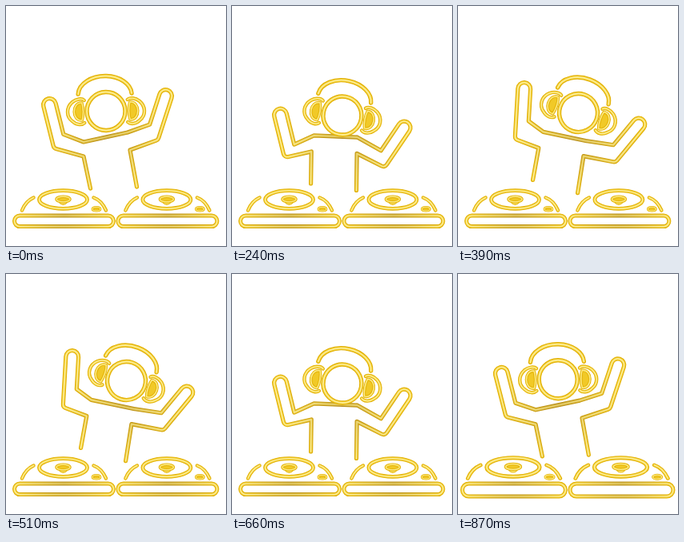
An HTML page with a canvas for the animation above (0.9 s loop, 275 by 300 pixels).

```html
<!DOCTYPE html>
<html lang="en">
<head>
<meta charset="utf-8">
<title>DJ</title>
<style>
  html, body { margin: 0; width: 100%; height: 100%; overflow: hidden; background: #fff; }
  canvas { display: block; width: 275px; height: 300px; }
</style>
</head>
<body>
<canvas id="stage" width="275" height="300"></canvas>
<script>
const ctx = document.getElementById('stage').getContext('2d');
const LOOP = 900, STEP = 30;
const GOLD = ['#e0ae04', '#f1c927', '#fcec90'];
const DULL = ['#b58c1c', '#c9a632', '#e3cb68'];
const HAND_RADIUS = 7.9, FOREARM = 40;

// Golds that turn duller towards a point.
function shaded(x, y, radius) {
  return GOLD.map((gold, i) => {
    const gradient = ctx.createRadialGradient(x, y, 0, x, y, radius);
    gradient.addColorStop(0, DULL[i]);
    gradient.addColorStop(1, gold);
    return gradient;
  });
}

function glow(path, width = 5.4, colors = GOLD) {
  ctx.lineJoin = ctx.lineCap = 'round';
  [1, 0.66, 0.34].forEach((part, i) => {
    ctx.strokeStyle = colors[i];
    ctx.lineWidth = width * part;
    ctx.stroke(path);
  });
}

function filledGlow(path, width) {
  ctx.fillStyle = GOLD[1];
  ctx.fill(path);
  glow(path, width);
}

function ellipse(x, y, rx, ry, from = 0, to = 2 * Math.PI) {
  const path = new Path2D();
  path.ellipse(x, y, rx, ry, 0, from, to);
  return path;
}

// The whole dance is one sway to the right and back, with a bob halfway.
function dancer(time) {
  const sway = (1 - Math.cos(2 * Math.PI * time / LOOP)) / 2;
  const bob = 4 * sway * (1 - sway);
  const move = (from, shift, dip = 0) => from + shift * sway + dip * bob;
  const lean = move(8.5, -16.5);
  return {
    head: { x: move(125, 27, -2), y: move(131.5, 1.3, 4.8), tilt: move(-1, 20) },
    left: {
      side: -1, lean, leg: 40,
      handX: move(54.5, 31.5, -11.5), handY: move(123.5, -25.5, 27),
      tilt: move(-14, 20, -11), reach: move(54, 11, -7),
      waistX: move(97, 4), waistY: move(188, -11),
      shoulderX: move(97, 10), shoulderY: move(170, -13, -1)
    },
    right: {
      side: 1, lean, leg: 46,
      handX: move(199.5, 27.5, 0.5), handY: move(112.5, 33.4, 21.3),
      tilt: move(18, 22, 4), reach: 55,
      waistX: move(155, 2), waistY: move(180, 8),
      shoulderX: move(152, 8), shoulderY: move(158, 11)
    }
  };
}

// From the foot up the side, round the hand and back to the shoulder.
function armPath(arm) {
  const path = new Path2D(), angle = arm.tilt * Math.PI / 180;
  const upX = Math.sin(angle), upY = -Math.cos(angle);
  const outX = -upY * arm.side, outY = upX * arm.side;
  const outerX = arm.handX + outX * HAND_RADIUS, outerY = arm.handY + outY * HAND_RADIUS;
  const innerX = arm.handX - outX * HAND_RADIUS, innerY = arm.handY - outY * HAND_RADIUS;
  const start = Math.atan2(outY, outX);

  path.moveTo(arm.waistX + arm.lean, arm.waistY + arm.leg);
  path.lineTo(arm.waistX, arm.waistY);
  path.arcTo(outerX - upX * arm.reach, outerY - upY * arm.reach, outerX, outerY, 5);
  path.lineTo(outerX, outerY);
  path.arc(arm.handX, arm.handY, HAND_RADIUS, start, start - arm.side * Math.PI, arm.side > 0);
  path.lineTo(innerX - upX * FOREARM, innerY - upY * FOREARM);
  path.lineTo(arm.shoulderX, arm.shoulderY);
  return path;
}

function drawBody({ head, left, right }) {
  const body = armPath(left);
  body.lineTo(right.shoulderX, right.shoulderY);
  body.addPath(armPath(right));
  glow(body, 5.2, shaded(head.x, head.y + 30, 75));
}

function drawHead({ x, y, tilt }) {
  ctx.save();
  ctx.translate(x, y);
  ctx.rotate(tilt * Math.PI / 180);
  glow(ellipse(0, 0, 24, 24));
  glow(ellipse(-1, -20.5, 33.5, 23.5, Math.PI * 1.02, Math.PI * 1.98));
  for (const side of [-1, 1]) {
    ctx.save();
    ctx.scale(side, 1);
    glow(new Path2D('M27 -14 C30 -17 37 -16 42 -12 C50 -5 50 6 42 12 C37 17 30 17 27 14'), 4.4);
    filledGlow(new Path2D('M30 -11 C43 -12 43 12 30 11 C28 5 28 -5 30 -11 Z'), 3.6);
    ctx.restore();
  }
  ctx.restore();
}

function drawDeck(center, big) {
  const halfWidth = big ? 64.5 : 62, height = big ? 16 : 13.6;
  const base = new Path2D();
  base.roundRect(center - halfWidth, 262, 2 * halfWidth, height, height / 2);
  glow(base, 5, shaded(center, 262, 62));

  ctx.save();
  ctx.translate(center - 1, 256);
  if (big) ctx.scale(1.1, 1.04);
  glow(ellipse(0, -14, 30, 11.3), 4.8);
  filledGlow(new Path2D('M-4 -10.5 Q0 -6.5 4 -10.5 Z'), 2.6);
  filledGlow(ellipse(0, -14.5, 8.5, 3.3), 3.4);
  glow(new Path2D('M-51.5 -0.5 Q-47 -12 -37 -16.5'), 4.4);
  glow(new Path2D('M38 -16.5 Q48 -13 53.5 -0.5'), 4.4);
  filledGlow(ellipse(41.5, -2.2, 5, 2.4), 2.8);
  ctx.restore();
}

function draw(now) {
  const time = Math.floor(now % LOOP / STEP) * STEP;
  // The decks jump on the last step of each half loop.
  const big = time % (LOOP / 2) === LOOP / 2 - STEP;
  const pose = dancer(time);
  ctx.fillStyle = '#fff';
  ctx.fillRect(0, 0, 275, 300);
  drawBody(pose);
  drawHead(pose.head);
  for (const side of [-1, 1]) drawDeck(137.2 + side * (big ? 67.3 : 64.7), big);
}

let start;
function tick(now) {
  start ??= now;
  draw(now - start);
  requestAnimationFrame(tick);
}
draw(0);
requestAnimationFrame(tick);
</script>
</body>
</html>
```
